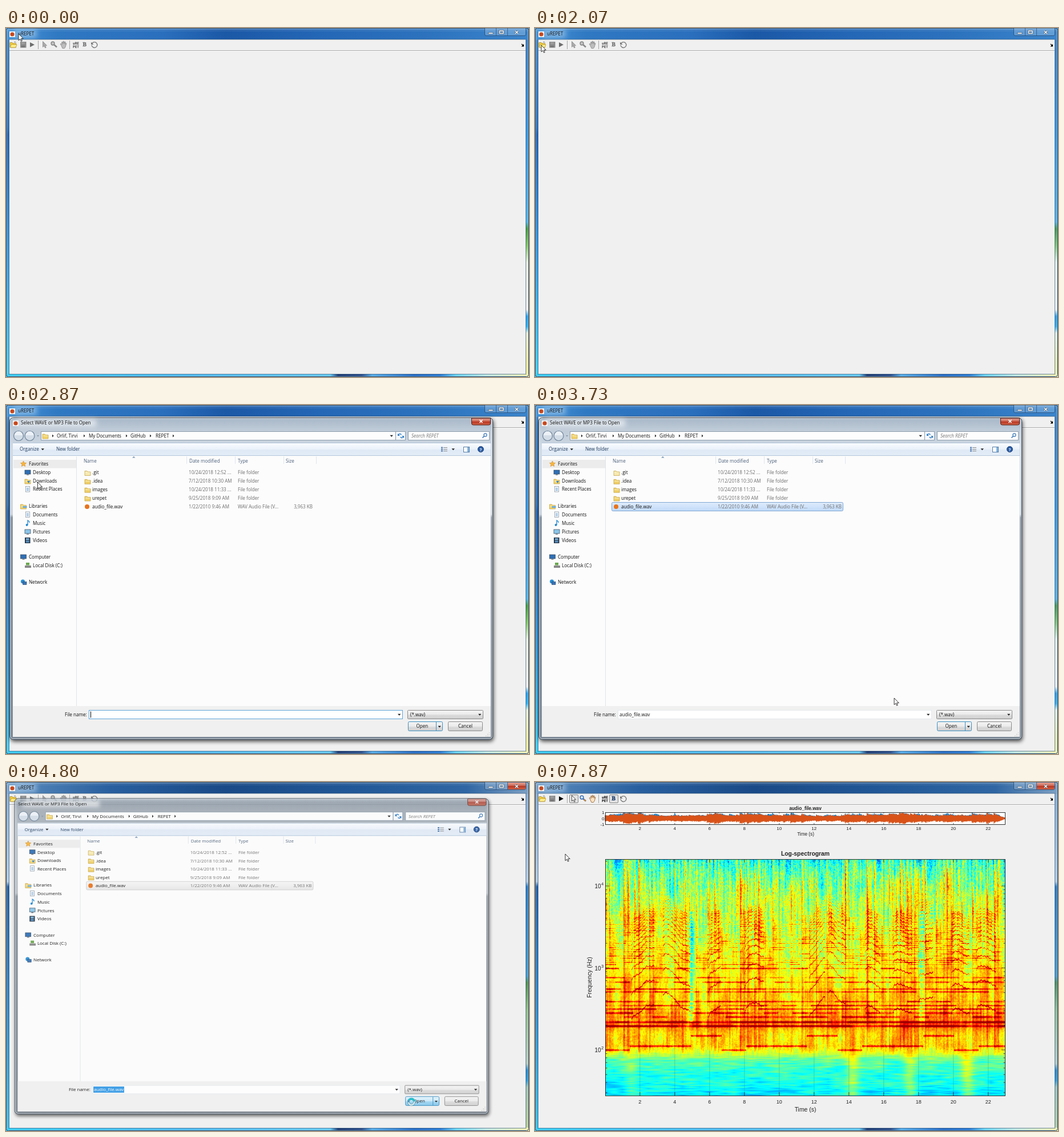
These frames come from a looping animation (916x611 px, 8000 ms). An HTML page with a canvas:

```html
<!DOCTYPE html>
<html lang="en">
<head>
<meta charset="utf-8">
<title>uREPET</title>
<style>
html, body { margin: 0; width: 100%; height: 100%; overflow: hidden; background: #f0f0f0; }
svg { display: block; width: 916px; height: 611px; }
text { font: 8.1px "Open Sans", sans-serif; fill: #111; white-space: pre; }
.plot text { font-family: "Liberation Sans", sans-serif; fill: #222; }
canvas { display: block; }
</style>
</head>
<body>
<svg id="stage" viewBox="0 0 916 611"></svg>
<script>
const stage = document.getElementById('stage');
const clamp = (v, lo = 0, hi = 1) => Math.min(hi, Math.max(lo, v));

// Markup helpers
const rect = (x, y, w, h, fill, more = '') => `<rect x="${x}" y="${y}" width="${w}" height="${h}" fill="${fill}" ${more}/>`;
const box = (x, y, w, h, fill, stroke, rx = 0) => rect(x + .5, y + .5, w - 1, h - 1, fill, `stroke="${stroke}" rx="${rx}"`);
const path = (d, fill, more = '') => `<path d="${d}" fill="${fill}" ${more}/>`;
const line = (d, stroke, w = 1, more = '') => path(d, 'none', `stroke="${stroke}" stroke-width="${w}" ${more}`);
const disc = (x, y, r, fill, more = '') => `<circle cx="${x}" cy="${y}" r="${r}" fill="${fill}" ${more}/>`;
const text = (x, y, s, style = '', more = '') => `<text x="${x}" y="${y + 2.9}" style="${style}" ${more}>${s}</text>`;
const group = (id, body, more = '') => `<g id="${id}" ${more}>${body}</g>`;
const at = (x, y, body) => `<g transform="translate(${x} ${y})">${body}</g>`;
const grad = (id, dir, stops) => `<linearGradient id="${id}" x2="${dir === 'x' ? 1 : 0}" y2="${dir === 'y' ? 1 : 0}">` +
  stops.split(',').map(s => { const [o, c] = s.trim().split(' '); return `<stop offset="${o}" stop-color="${c}"/>`; }).join('') + '</linearGradient>';

// Seeded noise
function hash(x, y) {
  let h = Math.imul(x, 374761393) + Math.imul(y, 668265263);
  h = Math.imul(h ^ h >>> 13, 1274126177);
  return ((h ^ h >>> 16) >>> 0) / 2 ** 32;
}
function noise(x, y) {
  const i = Math.floor(x), j = Math.floor(y), u = x - i, v = y - j;
  const top = hash(i, j) * (1 - u) + hash(i + 1, j) * u;
  const low = hash(i, j + 1) * (1 - u) + hash(i + 1, j + 1) * u;
  return top * (1 - v) + low * v;
}
// Piecewise linear lookup in rows of [key, ...values]
function lookup(rows, k) {
  if (k <= rows[0][0]) return rows[0].slice(1);
  for (let i = 1; i < rows.length; i++) {
    if (k > rows[i][0]) continue;
    const a = rows[i - 1], b = rows[i], u = (k - a[0]) / (b[0] - a[0]);
    return a.slice(1).map((v, n) => v + (b[n + 1] - v) * u);
  }
  return rows[rows.length - 1].slice(1);
}
const STEP = 0.2085, PX = 30.5;
const hit = i => .25 + .75 * hash(i, 7) ** 1.4;
function beat(s, decay) {
  const i = Math.floor(s / STEP), d = s - i * STEP;
  return Math.max(...[0, 1, 2].map(k => hit(i - k) * Math.exp(-(d + k * STEP) * decay)));
}

const defs = '<defs>' +
  grad('titleIdle', 'x', '0 #4796d8,.1 #2f78c2,.3 #2a6fbd,.42 #1b58a6,.6 #2467b6,.8 #2c72bd,1 #3b85cc') +
  grad('titleOn', 'x', '0 #7fa6cc,.06 #4c7fb4,.2 #295f9f,.42 #1a4a87,.65 #215796,.88 #2f66a3,1 #7da0c4') +
  grad('leftIdle', 'y', '0 #3f86ca,.26 #2a72c0,.28 #1d62b8,.6 #2b93e2,1 #38d2f8') +
  grad('leftOn', 'y', '0 #86abd0,.26 #b2cbe2,.275 #1d5ba4,.6 #2784cc,1 #35c2e8') +
  grad('rightIdle', 'y', '0 #3a7fc4,.27 #2f95e6,.54 #4fb2e8,.56 #3f9a3a,.61 #7ec860,.66 #e8f0e0,.8 #f4f4f0,.82 #22a0f0,.85 #28b0f8,.87 #e8f0d8,.95 #f0eba0,1 #f4ee9a') +
  grad('rightOn', 'y', '0 #86abd0,.26 #b2cbe2,.275 #2478c4,.54 #3f9bd0,.56 #4a9048,.64 #8fbe84,.8 #b6ccc0,.82 #2288cc,.85 #2898d8,.87 #9fc2b0,1 #b8cf90') +
  grad('bottom', 'x', '0 #2ccaf4,.35 #45b8f0,.62 #5cc8f5,.635 #0c2a66,.68 #1b3f80,.7 #4aa8e8,.78 #1560c0,.83 #1a70d0,.86 #5fd4f4,.92 #bfe8e0,1 #f2eeaa') +
  grad('red', 'y', '0 #e3a094,.45 #cf6a58,.5 #b8331f,1 #cf6347') +
  grad('glass', 'y', '0 #a9bacb,.04 #c6d2df,.1 #d3deea,.3 #d0dae4,.31 #8b98a6,1 #7f8c9a') +
  grad('bar', 'y', '0 #fafcff,.5 #eaf1fa,.52 #dfe9f5,1 #e3edf8') +
  grad('picked', 'y', '0 #dfecfc,1 #c0daf8') +
  grad('faded', 'y', '0 #f7f7f7,1 #e6e6e6') +
  grad('button', 'y', '0 #f4f4f4,.5 #ebebeb,.52 #dddddd,1 #cfcfcf') +
  grad('hot', 'y', '0 #e5f4fc,.5 #c8e8fa,.52 #a4d8f4,1 #80c4ea') +
  '<filter id="shade" x="-5%" y="-5%" width="110%" height="112%"><feGaussianBlur stdDeviation="3.5"/></filter>' +
  '<filter id="glow" x="-30%" y="-80%" width="160%" height="260%"><feGaussianBlur stdDeviation="4"/></filter></defs>';

// Small icons
const folder = (x, y, c = '#f2d36b') => at(x, y, path('M0 2h4l1 1.5h5V10H0z', c, 'stroke="#b9922b" stroke-width=".6"') + path('M1 4.5h8v1H1z', '#fdf3c4'));
const lens = (c, glass) => disc(82, 27, 2.9, glass, `stroke="${c}" stroke-width="1.5"`) + line('M84.5 29.5l4.5 4', c, 2.4);
const hand = (fill, edge) => path('M96.5 30l-1.5-2 1.5-.7 1.7 1.5-.6-4 1.4-.5.8 3 .3-4h1.4l.4 4 1-3.2 1.3.4-.5 4 1.2-2 1 .6-2 6.5-1.5 2h-3.5z', fill, `stroke="${edge}" stroke-width=".8"`);
const pointer = (fill, edge) => path('M64.5 23.5v10l2.4-2.1 1.7 3.5 1.6-.8-1.7-3.3h3z', fill, `stroke="${edge}" stroke-width=".8"`);

function tools(on) {
  const frame = x => box(x, 22, 16, 15, '#e2e2e2', '#888', 1.5), letter = on ? '#26436e' : '#777';
  return (on ? frame(60) + frame(130) : '') +
    at(7, 23, path('M0 2.5h4l1 1.5h5.5v7H0z', '#f6d13c', 'stroke="#a5801c" stroke-width=".8"') + path('M2 6h10l-2 5H.5z', '#fff08c', 'stroke="#b58f20" stroke-width=".7"') + line('M7 2q2-2 3.5.5', '#555', .8)) +
    rect(25, 24, 10.5, 10.5, '#8a8a8a') + rect(27, 24.5, 6, 4, '#9c9c9c') + rect(27, 31, 6, 3, '#777') +
    path('M42 25v8.5l8-4.25z', on ? '#000' : '#6d6d6d') +
    line('M56.5 22v15M111.5 22v15', '#a5a5a5') +
    (on ? pointer('#fff', '#222') : pointer('#aaa', '#888')) +
    lens(on ? '#3f6fb0' : '#888', on ? '#d8f0ff' : '#c4c4c4') + (on ? line('M85.5 30.5l3.5 3', '#c98a3c', 2.2) : '') +
    hand(on ? '#ffe2c0' : '#bdbdbd', on ? '#8a5a2a' : '#858585') +
    [['uRE', 26.5], ['PET', 32]].map(([s, y]) => text(117, y, s, `font:bold 6.1px 'DejaVu Sans Mono',monospace;fill:${on ? '#000' : '#444'}`)).join('') +
    text(134.5, 29.5, 'B', `font:bold 9.5px 'Liberation Serif',serif;fill:${letter};stroke:${letter};stroke-width:.6px`) +
    line('M151 26.5a4.9 4.9 0 1 1-1 3.5', '#777', 1.4) + path('M149 24.5v4.5h4.5z', '#777');
}

function mainWindow() {
  const skin = on => rect(0, 0, 916, 21, `url(#title${on})`) + rect(0, 0, 916, 6, '#fff', 'opacity=".07"') +
    rect(0, 21, 6, 590, `url(#left${on})`) + rect(910, 21, 6, 590, `url(#right${on})`);
  const dark = '#1d3f66';
  return group('idle', skin('Idle')) + group('on', skin('On')) +
    rect(0, 605, 916, 6, 'url(#bottom)') +
    rect(5.5, 20, 905, 586, '#f0f0f0', 'stroke="#3c5f82" stroke-opacity=".7"') +
    rect(.5, .5, 915, 610, 'none', 'stroke="#12324f" rx="4"') + rect(1.5, 1.5, 913, 608, 'none', 'stroke="#d6ecff" stroke-opacity=".55" rx="3"') +
    rect(14, 3, 40, 14, '#b8d8f4', 'opacity=".55" filter="url(#glow)"') +
    rect(6, 6, 10, 10, '#f4f4f4') + disc(11, 11, 3.6, '#c8481c') + text(21, 10.5, 'uREPET') +
    path('M838.5 0v11q0 2.5 2.5 2.5h67q2.5 0 2.5-2.5V0', '#b9d3ec', `fill-opacity=".32" stroke="${dark}" stroke-opacity=".7"`) +
    path('M879 1h31v10q0 2-2 2h-29z', 'url(#red)', 'id="mainClose"') +
    line('M858.5 0v13M878.5 0v13', dark, 1, 'opacity=".6"') +
    rect(845, 8, 8, 2.5, '#fff', 'stroke="#345" stroke-width=".6"') +
    rect(864.5, 5, 6.5, 4.5, 'none', 'stroke="#345" stroke-width="2.6"') + rect(864.5, 5, 6.5, 4.5, 'none', 'stroke="#fff" stroke-width="1.5"') +
    line('M892 5l5 5M897 5l-5 5', '#345', 2.6) + line('M892 5l5 5M897 5l-5 5', '#fff', 1.6) +
    line('M6 39.5h904', '#a8a8a8') + line('M6 40.5h904', '#fff') +
    line('M903 28l3 3', '#000', 1.2) + path('M907 28v4.5h-4.5z', '#000') +
    group('toolsOff', tools(false)) + group('toolsOn', tools(true));
}

const ticks = [...Array(11).keys()].map(i => 2 + 2 * i);
const tickX = n => 122.8 + n * PX;
const axes = (top, bottom, size, y) => rect(123, top, 701, bottom - top, '#fff') +
  ticks.map(n => text(tickX(n), y, n, `font-size:${size}px`, 'text-anchor="middle"')).join('');
const axisFrame = (top, bottom, len = 2) => rect(123.5, top + .5, 700, bottom - top, 'none', 'stroke="#222" stroke-width=".9"') +
  line(ticks.map(n => `M${tickX(n)} ${top}v${len}M${tickX(n)} ${bottom}v${-len}`).join(''), '#222', .8);

function wavePlot() {
  let blue = '', orange = '';
  for (let x = 0; x < 700; x += .8) {
    const s = x / PX, phrase = .55 + .55 * noise(s * 1.1, 40), fade = clamp((23 - s) * 2, .15);
    const a = (3 + 6.5 * beat(s, 2)) * phrase * fade + .8, j = k => .8 + .4 * hash(Math.round(x * 10), k);
    const seg = (up, down) => `M${(123 + x).toFixed(1)} ${(63.7 - up).toFixed(1)}V${(63.7 + down).toFixed(1)}`;
    const extra = 5 * Math.max(0, noise(s * 5, 71) - .45) * fade;
    blue += seg(Math.min(10, a * j(1) + extra), a * .8);
    orange += seg(Math.min(9.5, a * j(2)), Math.min(9.5, a * j(3)));
  }
  return axes(53, 74, 8, 81) + line(blue, '#0072bd', 1) + line(orange, '#d95319', 1.1) + axisFrame(53, 74) +
    ['1', '0', '-1'].map((s, i) => text(121.5, 53 + i * 10.7, s, 'font-size:8px', 'text-anchor="end"')).join('') +
    text(473.5, 46.5, 'audio_file.wav', 'font-weight:bold;font-size:8.3px', 'text-anchor="middle"') +
    text(474, 91.5, 'Time (s)', 'font-size:8.2px', 'text-anchor="middle"');
}

function spectrumPlot() {
  let marks = '';
  for (let d = 1; d < 5; d++) for (let n = 1; n < 10; n++) {
    const y = 469 - 143.5 * (d - 2 + Math.log10(n)), len = n === 1 ? 7 : 3.5;
    if (y > 135 && y < 549) marks += `M123 ${y.toFixed(1)}h${len}M824 ${y.toFixed(1)}h${-len}`;
  }
  const label = (x, y, s, more = '') => text(x, y, s, 'font-size:10.4px', 'text-anchor="middle" ' + more);
  return axes(135, 549, 9, 560) +
    '<foreignObject x="123" y="135" width="701" height="414"><canvas id="spectrum" width="701" height="414"></canvas></foreignObject>' +
    line(ticks.map(n => `M${tickX(n)} 135v414`).join(''), '#223', .7, 'opacity=".28"') +
    line(marks, '#222', .8) + axisFrame(135, 549, 6) +
    [2, 3, 4].map(n => { const y = 470 - 143.5 * (n - 2); return text(115.5, y + .5, 10, 'font-size:10px', 'text-anchor="end"') + text(116, y - 4.5, n, 'font-size:7.5px'); }).join('') +
    text(473.5, 126.5, 'Log-spectrogram', 'font-weight:bold;font-size:10.35px', 'text-anchor="middle"') +
    label(473.5, 574, 'Time (s)') + label(0, 0, 'Frequency (Hz)', 'transform="translate(96 342) rotate(-90)"');
}

function paintSpectrum() {
  const W = 701, H = 414, field = new Float32Array(W * H);
  const dab = (x, y, amp, w) => {
    const mid = Math.round(y -= 135);
    for (let r = Math.max(0, mid - 4); r <= Math.min(H - 1, mid + 4); r++) field[r * W + x] += amp * Math.exp(-(((r - y) / w) ** 2));
  };
  const strings = [427, 420, 411, 404, 397, 391, 384, 367, 362, 350, 342, 326];
  const base = [[135, .42], [160, .5], [200, .57], [240, .6], [300, .62], [350, .66], [395, .68], [425, .75], [440, .68], [462, .68], [474, .59], [486, .46], [510, .4], [549, .36]];
  // Sung phrases: start, end, first and last height of the lowest partial
  const voice = [[1.5, 2.8, 404, 391], [3.3, 5, 366, 404], [5.9, 6.6, 404, 391], [8, 9.1, 391, 389], [11.7, 12.6, 404, 378], [12.8, 13.8, 362, 391],
    [14.9, 15.8, 391, 404], [16.5, 17.6, 397, 404], [18, 18.8, 376, 376], [19.9, 20.9, 391, 402], [21.3, 22.4, 391, 397]];
  for (let x = 0; x < W; x++) {
    const s = x / PX, bar = s % 6.67, ring = .55 + .45 * beat(s, 2);
    dab(x, bar < 1.4 ? 469 : bar < 4.9 ? 462 : 444, .22, 1.6);
    strings.forEach((y, i) => {
      const g = hash(i, Math.floor(s / .834 + i * .37) + 90);
      dab(x, y, (i < 2 ? .16 : .04) + .3 * g * (g > .3) * ring, i < 4 ? 1.7 : 1.2);
    });
    for (let k = 0; k < 26; k++) {
      const g = hash(k + 50, Math.floor(s / .62 + k * .21));
      dab(x, 319 - k * 3.7, .32 * g * g * ring * (1 - k / 45), .8);
    }
    for (const [a, b, from, to] of voice) {
      if (s < a || s > b) continue;
      const u = (s - a) / (b - a), glide = from + (to - from) * u * u * (3 - 2 * u);
      const bend = 8 * (noise(s * 3, from) - .5) + .9 * Math.sin(s * 34) + 9 * Math.exp(-(s - a) * 9);
      for (let n = 1; n < 16; n++) dab(x, glide + bend - 143.5 * Math.log10(n), .3 / (1 + .09 * n), 1);
    }
  }
  const ctx = document.getElementById('spectrum').getContext('2d'), img = ctx.createImageData(W, H);
  const levels = Array.from({ length: H }, (_, y) => lookup(base, y + 135)[0]);
  for (let x = 0; x < W; x++) {
    const s = x / PX, snap = beat(s, 9), swell = beat(s, 3);
    const gap = Math.exp(-(((s - 4.95) / .14) ** 2)) + .7 * Math.exp(-(((s - 18.2) / .13) ** 2));
    const bloom = [1.5, 14.2, 17.5, 20.8].reduce((v, c, i) => v + (i ? 1 : .5) * Math.exp(-(((s - c) / .38) ** 2)), 0);
    for (let y = 0; y < H; y++) {
      const Y = y + 135, i = y * W + x, low = clamp((Y - 466) / 18), high = clamp((330 - Y) / 150);
      let v = levels[y] + field[i];
      v += (1 - low) * ((.1 + .1 * high) * (noise(x / 2.2, y / 45 + 9) - .5) + (.1 + .1 * high) * (noise(x / 1.5, y / 1.8 + 300) - .5) +
        .16 * (noise(x / 9, y / 24 + 500) - .5) + (.1 + .16 * high) * (snap - .28) + .1 * (swell - .4));
      v += low * (.13 * (noise(x / 15, y / 1.7 + 700) - .5) + .07 * (noise(x / 30, y / 14 + 900) - .5) + .13 * bloom);
      if (Y > 225 && Y < 420) v -= .2 * gap;
      v = clamp(v, .22, .97);
      [3, 2, 1].forEach((c, k) => { img.data[i * 4 + k] = 255 * clamp(1.5 - Math.abs(4 * v - c)); });
      img.data[i * 4 + 3] = 255;
    }
  }
  ctx.putImageData(img, 0, 0);
}

function dialog() {
  const arrow = (x, y) => path(`M${x - 1} ${y - 2.5}v5l2.5-2.5z`, '#222');
  const down = (x, y) => path(`M${x - 2.5} ${y - 1.2}h5.5l-2.75 3z`, '#222');
  const grey = 'fill:#6d6d6d';
  const screen = (x, y, c = '#2f6fb5') => rect(x, y - 4, 10, 7, c, 'stroke="#345" stroke-width=".7"') + rect(x + 3, y + 3.5, 4, 1.2, '#567');
  const page = (x, y) => rect(x + 1.5, y - 5, 7, 9.5, '#fff', 'stroke="#789" stroke-width=".7"') + line(`M${x + 3} ${y - 2}h4M${x + 3} ${y}h4M${x + 3} ${y + 2}h4`, '#4a8cc8', .8);
  const note = (x, y) => line(`M${x + 5} ${y + 3}v-8q3 1 3 4`, '#1f86d0', 1.3) + disc(x + 3.5, y + 3, 1.9, '#1f86d0');
  const globe = (x, y) => disc(x + 4, y - 1.5, 3.6, '#2b8fd4') + rect(x + 4, y - 1, 6.5, 5, '#3a73b4', 'stroke="#246" stroke-width=".6"');
  const star = (x, y) => path(`M${x + 5} ${y - 5}l1.5 3.2 3.6.4-2.7 2.4.8 3.5-3.2-1.8-3.2 1.8.8-3.5L${x} ${y - 1.4}l3.5-.4z`, '#f9b53a', 'stroke="#c07a18" stroke-width=".5"');
  const film = (x, y) => rect(x, y - 5, 9.5, 10, '#26384c') + rect(x + 2, y - 3.7, 5.5, 3.2, '#78b0d8') + rect(x + 2, y + .5, 5.5, 3.2, '#5890c0');
  const nav = [
    [0, 103, 'Favorites', star], [1, 118, 'Desktop', screen], [1, 133, 'Downloads', (x, y) => folder(x, y - 5) + path(`M${x + 4} ${y}h5l-2.5 4z`, '#2b7fd0')], [1, 147.5, 'Recent Places', page],
    [0, 177, 'Libraries', (x, y) => folder(x, y - 5) + rect(x + 4, y, 7, 3, '#67a8d8')], [1, 192, 'Documents', page], [1, 207, 'Music', note], [1, 222, 'Pictures', (x, y) => screen(x, y, '#8cc6ea')], [1, 237, 'Videos', film],
    [0, 266, 'Computer', screen], [1, 281, 'Local Disk (C:)', (x, y) => rect(x, y, 11, 4, '#888') + rect(x + 2, y - 5, 6, 4.5, '#6aa84f')], [0, 310.5, 'Network', globe]];
  const files = [['.git', '10/24/2018 12:52 ...'], ['.idea', '7/12/2018 10:30 AM'], ['images', '10/24/2018 11:33 ...'], ['urepet', '9/25/2018 9:09 AM'], ['audio_file.wav', '1/22/2010 9:46 AM']];
  const crumbs = [['Orlif, Tirvi', 89, 137], ['My Documents', 145, 211], ['GitHub', 218, 253], ['REPET', 262, 293]];
  const columns = [['Name', 136, 316], ['Date modified', 321, 401], ['Type', 406, 486], ['Size', 490, 543]];
  return rect(8, 25, 846, 564, '#000', 'rx="6" opacity=".7" filter="url(#shade)"') +
    rect(6.5, 22.5, 846, 563, 'url(#glass)', 'id="pane" rx="6" stroke="#2b3c4e"') + rect(7.5, 23.5, 844, 561, 'none', 'rx="5" stroke="#fff" stroke-opacity=".65"') +
    rect(20, 25, 138, 13, '#fff', 'opacity=".6" filter="url(#glow)"') +
    group('dialogIcon', rect(12, 27, 10, 10, '#f4f4f4') + disc(17, 32, 3.6, '#c8481c')) +
    text(26, 31.5, 'Select WAVE or MP3 File to Open', '', 'id="dialogTitle"') +
    group('dialogClose', path('M815.5 23h33v9q0 3-3 3h-27q-3 0-3-3z', 'url(#red)', 'stroke="#5a2018"') + line('M829.5 26l5 5M834.5 26l-5 5', '#fff', 1.6)) +
    [22, 41.5].map(x => disc(x, 54, 8.5, '#d3dde8', 'stroke="#6f8499" stroke-width="1.2"') + path(`M${x - 7} 53a7 7 0 0 1 14 0z`, '#f2f6fa', 'opacity=".8"')).join('') +
    path('M54 53h4l-2 2.5z', '#8796a6') +
    box(61, 46, 622, 16, '#fdfdfe', '#8d9cab') + folder(64, 49) + arrow(82, 54) +
    crumbs.map(([s, x, a]) => text(x, 53.7, s) + arrow(a, 54)).join('') + down(675, 54) +
    box(682, 46, 18, 16, '#f6f9fc', '#8d9cab') + line('M687 52q3-3 5.5 0M696 56q-3 3-5 0', '#2f7cc4', 1.5) + path('M686 50v4h4zM697 58v-4h-4z', '#2f7cc4') +
    box(704, 46, 143, 16, '#fdfdfe', '#8d9cab') + text(710, 53.7, 'Search REPET', 'font-style:italic;fill:#777') +
    disc(839.5, 52.5, 2.6, 'none', 'stroke="#3b78b8" stroke-width="1.2"') + line('M837.5 54.5l-3 3', '#3b78b8', 1.6) +
    rect(12, 66, 837, 515, '#fcfcfc') + rect(12, 66, 837, 23, 'url(#bar)') + line('M12 66.5h837M12 88.5h837', '#b4c6da') +
    text(24, 77.5, 'Organize', 'fill:#1e395b') + down(64, 77.5) + text(88, 77.5, 'New folder', 'fill:#1e395b') +
    line('M762 74.5h3M762 77.5h3M762 80.5h3', '#4a78b0', 2) + line('M766 74.5h7M766 77.5h7M766 80.5h7', '#888', 1) + down(783, 77.5) +
    box(801, 73, 11, 10, '#fff', '#5a7ea6') + rect(808, 74, 3, 8, '#7fb2e0') +
    disc(831.5, 77.5, 5, '#2d5fa8', 'stroke="#1d3f74"') + text(829.7, 77.6, '?', 'fill:#fff;font-weight:bold;font-size:7.5px') +
    rect(13, 96, 110, 14.5, '#ececec') + line('M123.5 90V527', '#e0e4ea') +
    nav.map(([sub, y, s, icon]) => icon(sub ? 33 : 25.5, y) + text(sub ? 47 : 40, y, s)).join('') +
    columns.map(([s, x, edge]) => text(x, 98, s, 'fill:#4c607a') + line(`M${edge + .5} 90v13`, '#dfe5ee')).join('') + path('M221 92.5h5.5l-2.75-2.8z', '#7d9ab8') +
    group('row', box(134, 170, 406, 16, 'inherit', 'inherit', 2).replace(/(fill|stroke)="inherit"/g, '')) +
    files.map(([name, date], i) => {
      const y = 118.5 + i * 14.85, last = i === 4;
      return (last ? disc(142, y, 4, '#e8741c') : folder(138, y - 5, i ? '#efd06a' : '#f6e9b0')) + text(151, y, name) + text(320, y, date, grey) +
        text(406, y, last ? 'WAV Audio File (V...' : 'File folder', grey) + (last ? text(537, y, '3,963 KB', grey, 'text-anchor="end"') : '');
    }).join('') +
    rect(12, 527, 837, 54, '#f0f0f0') + text(103, 542, 'File name:') +
    rect(145.5, 534.5, 549, 15, '#fff', 'id="field"') + down(688.5, 542) +
    line('M148.5 536.5v11', '#000', 1, 'id="caret"') + rect(147, 536.5, 55, 11, '#3399e6', 'id="mark"') + text(148, 542, 'audio_file.wav', '', 'id="fileName"') +
    box(703, 534, 133, 16, 'url(#button)', '#8a8a8a', 1) + text(708, 542, '(*.wav)') + down(829.5, 542) +
    rect(704.5, 554.5, 60, 16, 'url(#button)', 'id="open" stroke="#3c8fc0" rx="2"') + line('M753.5 555v15', '#3c8fc0') + text(718.5, 562.5, 'Open') + down(759, 563) +
    box(774, 554, 61, 17, 'url(#button)', '#8a8a8a', 2) + text(792, 562.5, 'Cancel') +
    line('M840 579.5h7M843 576.5h4M846 573.5h1', '#bbb', 1.2, 'stroke-dasharray="1.5 1.5"');
}

stage.innerHTML = defs + mainWindow() +
  group('wave', wavePlot(), 'class="plot"') + group('spec', spectrumPlot(), 'class="plot"') +
  group('tip', box(11, 44, 27, 13, '#fff', '#767676') + text(14, 50.3, 'Open', 'fill:#555')) +
  group('dialog', dialog()) +
  group('arrow', path('M0 0V11.7L2.7 9.3 4.5 13.2 6.2 12.4 4.5 8.6H8.2Z', '#fff', 'stroke="#111" stroke-width=".85"')) +
  group('busy', disc(0, 0, 5.2, 'none', 'stroke="#3f7f98" stroke-width="4"') + disc(0, 0, 5.2, 'none', 'stroke="#cfe6ec" stroke-width="2.9"') +
    line('M5.2 0A5.2 5.2 0 0 1 -3.7 3.7', '#18c3cf', 2.9) + line('M5.2 0A5.2 5.2 0 0 0 3.7 -3.7', '#4f96b8', 2.9));
paintSpectrum();

const el = {};
stage.querySelectorAll('[id]').forEach(n => { el[n.id] = n; });
const show = (id, yes) => { el[id].style.display = yes ? '' : 'none'; };
const set = (id, name, value) => el[id].setAttribute(name, value);

// Pointer route: time, x, y
const route = [[467, 22, 10], [560, 55, 13], [640, 64, 20], [720, 42, 27], [800, 11, 30], [2133, 11, 30], [2333, 15, 33], [2500, 15, 33], [2733, 6, 101],
  [2933, 80, 152], [3133, 195, 178], [3267, 200, 179], [3600, 590, 489], [3733, 629, 513], [4000, 682, 546], [4467, 710, 560], [4800, 710, 560],
  [5100, 420, 420], [5467, 133, 218], [5800, 79, 152], [6200, 53, 126]];

function update(ms) {
  const t = Math.floor((ms + 4) * .015) / .015 + .01;
  const active = t > 266 && t < 1933 || t > 4666;
  const clicked = t > 4533, busy = clicked && t < 7866, chosen = t > 3200, closing = t > 4667;
  show('on', active); show('idle', !active); show('mainClose', active);
  show('toolsOn', t > 7866); show('toolsOff', t < 7866);
  show('tip', t > 1599 && t < 1933);
  show('wave', t > 5200); show('spec', t > 7666);

  const visible = t > 2190 && t < 4917;
  show('dialog', visible);
  if (visible) {
    const p = closing ? (t - 4667) / 250 : clamp((t - 2130) / 270), settled = !closing && p === 1;
    const scale = closing ? 1 - .1 * p ** 2.6 : 1 - .1 * (1 - p) ** 1.27;
    const [cx, cy] = closing ? [458, 362] : [372, 222];
    set('dialog', 'transform', `translate(${cx} ${cy}) scale(${scale}) translate(${-cx} ${-cy})`);
    set('dialog', 'opacity', closing ? 1 - p ** 4 : clamp(p * 1.3));
    set('pane', 'fill-opacity', settled ? .96 : .72);
    show('dialogIcon', !closing);
    set('dialogTitle', 'x', closing ? 12.5 : 26);
    set('dialogClose', 'opacity', settled ? 1 : .75);
    show('row', chosen);
    set('row', 'fill', clicked ? 'url(#faded)' : 'url(#picked)');
    set('row', 'stroke', clicked ? '#d0d0d0' : '#7fa6d2');
    set('field', 'stroke', chosen ? '#e4e8ec' : '#5fa4d8');
    show('caret', !chosen); show('fileName', chosen); show('mark', clicked);
    el.fileName.style.fill = clicked ? '#fff' : '#111';
    set('open', 'fill', clicked ? 'url(#hot)' : 'url(#button)');
  }
  const [x, y] = lookup(route, t);
  show('arrow', !busy); show('busy', busy);
  set('arrow', 'transform', `translate(${x} ${y})`);
  set('busy', 'transform', `translate(${x} ${y}) rotate(${(Math.min(t, 6200) - 6200) * .36})`);
}

const start = performance.now();
function tick() {
  update((performance.now() - start) % 8000);
  requestAnimationFrame(tick);
}
tick();
</script>
</body>
</html>
```
